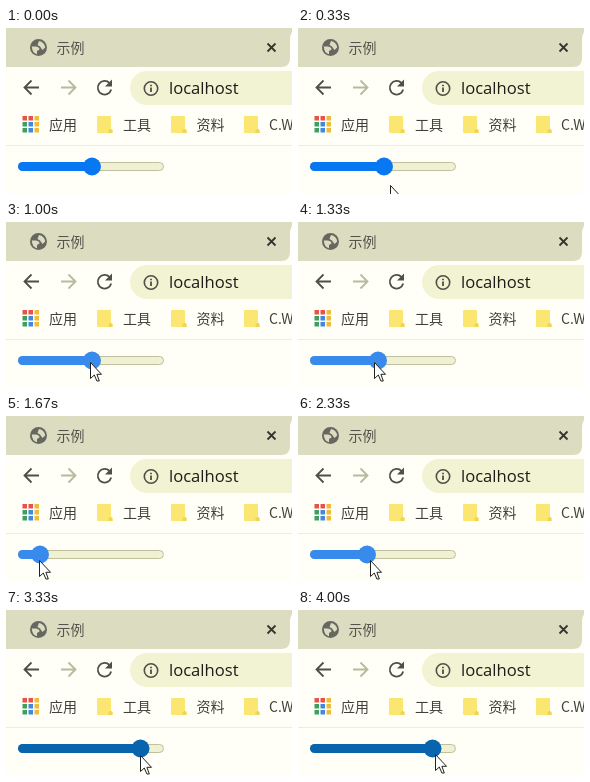
Write an HTML page that moves like this. It is 286x166 px and loops after 4.33 s.

```html
<!DOCTYPE html>
<html lang="zh">
<head>
<meta charset="utf-8">
<title>示例</title>
<style>
  html, body { margin: 0; width: 100%; height: 100%; overflow: hidden; background: #fffff7; }
  svg { display: block; width: 286px; height: 166px; }
  text { font: 14px "Noto Sans CJK SC", "Noto Sans CJK", "Noto Sans", sans-serif; fill: #3f4039; }
  .address { font: 16.6px "Open Sans", "Noto Sans", sans-serif; fill: #1c1d18; }
  .icon { fill: none; stroke: #4e5047; stroke-width: 1.8; }
</style>
</head>
<body>
<svg viewBox="0 0 286 166">
  <defs>
    <g id="folder">
      <path d="M1 0H13Q14 0 14 1V13L15.5 14V17H1Q0 17 0 16V1Q0 0 1 0Z" fill="#fae670"/>
      <path d="M11.500 17V14.500L13 13H14L15.500 14V17Z" fill="#efd555"/>
    </g>
  </defs>

  <!-- tab strip -->
  <rect width="286" height="39" fill="#dcdcc1"/>
  <path d="M286 4Q284 7 284 12V30Q284 39 275 39H286Z" fill="#fffff7"/>
  <circle cx="32.500" cy="19.500" r="8.500" fill="#666860"/>
  <path d="M25.800 18.500H30Q33.500 19 33.500 21.500L31 23V26.200Q26 25 25.800 18.500ZM33 13Q38.500 14 39.200 19.500L36.500 22L34 18.500L31.500 17Z" fill="#dcdcc1"/>
  <text x="50.500" y="25" style="fill:#53544c">示例</text>
  <path class="icon" d="M261.500 15.500L269.500 23.500M269.500 15.500L261.500 23.500" style="stroke:#34352f"/>

  <!-- toolbar -->
  <path class="icon" d="M33 59.500H18.500M25.500 52.500L18.500 59.500L25.500 66.500"/>
  <path class="icon" d="M55 59.500H69.500M62.500 52.500L69.500 59.500L62.500 66.500" style="stroke:#b8ba9b"/>
  <path class="icon" d="M103.500 55A6.800 6.800 0 1 0 105.200 61.500"/>
  <path d="M106 51.500V58.500H99Z" fill="#4e5047"/>
  <rect x="124" y="43" width="190" height="34" rx="17" fill="#f2f3d3"/>
  <circle class="icon" cx="145" cy="60.500" r="6.700" style="stroke-width:1.600"/>
  <path class="icon" d="M145 59.500V64M145 56.700V58.300"/>
  <text class="address" x="163" y="66">localhost</text>

  <!-- bookmarks -->
  <g id="apps"></g>
  <text x="43" y="102">应用</text>
  <use href="#folder" x="91" y="88"/>
  <text x="117" y="102">工具</text>
  <use href="#folder" x="165" y="88"/>
  <text x="190.500" y="102">资料</text>
  <use href="#folder" x="238" y="88"/>
  <text x="263" y="102">C.W</text>
  <path d="M0 117.500H286" stroke="#ededd8"/>

  <!-- slider -->
  <rect x="12.500" y="134.500" width="145" height="8" rx="4" fill="#f0f0d2" stroke="#bfc09f"/>
  <g id="range">
    <rect id="fill" x="12" y="134" height="9" rx="4.500"/>
    <circle id="thumb" cy="138.500" r="9"/>
  </g>
  <path id="cursor" d="M.5 .5V16.500L4.300 13L6.900 19H9.300L6.900 12.300H11.500Z" fill="#fff" stroke="#22221e"/>
</svg>
<script>
  const $ = id => document.getElementById(id);
  const LOOP = 4330;
  const IDLE = "#0778f2", HOVER = "#0864ad", ACTIVE = "#388aec";

  // start ms, thumb x, colour, cursor tip (absent while outside)
  const steps = [
    [0, 86, IDLE],
    [330, 86, IDLE, 92, 157],
    [670, 86, HOVER, 90, 147],
    [1000, 86, ACTIVE, 84, 140],
    [1330, 80, ACTIVE, 76, 140],
    [1670, 34, ACTIVE, 33, 144],
    [2000, 24, ACTIVE, 24, 142],
    [2330, 69, ACTIVE, 72, 144],
    [2670, 113, ACTIVE, 116, 145],
    [3000, 134.5, ACTIVE, 134, 145],
    [3330, 134.5, HOVER, 134, 145],
    [3670, 134.5, HOVER, 137, 144]
  ];

  const appColors = ["#e5534b", "#e5534b", "#efbb3d", "#3f9f61", "#4388df", "#efbb3d", "#3f9f61", "#4388df", "#efbb3d"];
  $("apps").innerHTML = appColors.map((color, i) =>
    `<rect x="${16.500 + i % 3 * 6}" y="${88 + Math.floor(i / 3) * 6}" width="4.5" height="4.5" fill="${color}"/>`).join("");

  function draw(now) {
    const time = now % LOOP;
    const [, x, color, tipX, tipY] = steps.findLast(step => step[0] <= time);
    $("range").setAttribute("fill", color);
    $("fill").setAttribute("width", x - 12);
    $("thumb").setAttribute("cx", x);
    $("cursor").style.display = tipX === undefined ? "none" : "";
    if (tipX !== undefined) $("cursor").setAttribute("transform", `translate(${tipX} ${tipY})`);
  }

  const start = performance.now();
  function tick() {
    draw(performance.now() - start);
    requestAnimationFrame(tick);
  }
  tick();
</script>
</body>
</html>
```
